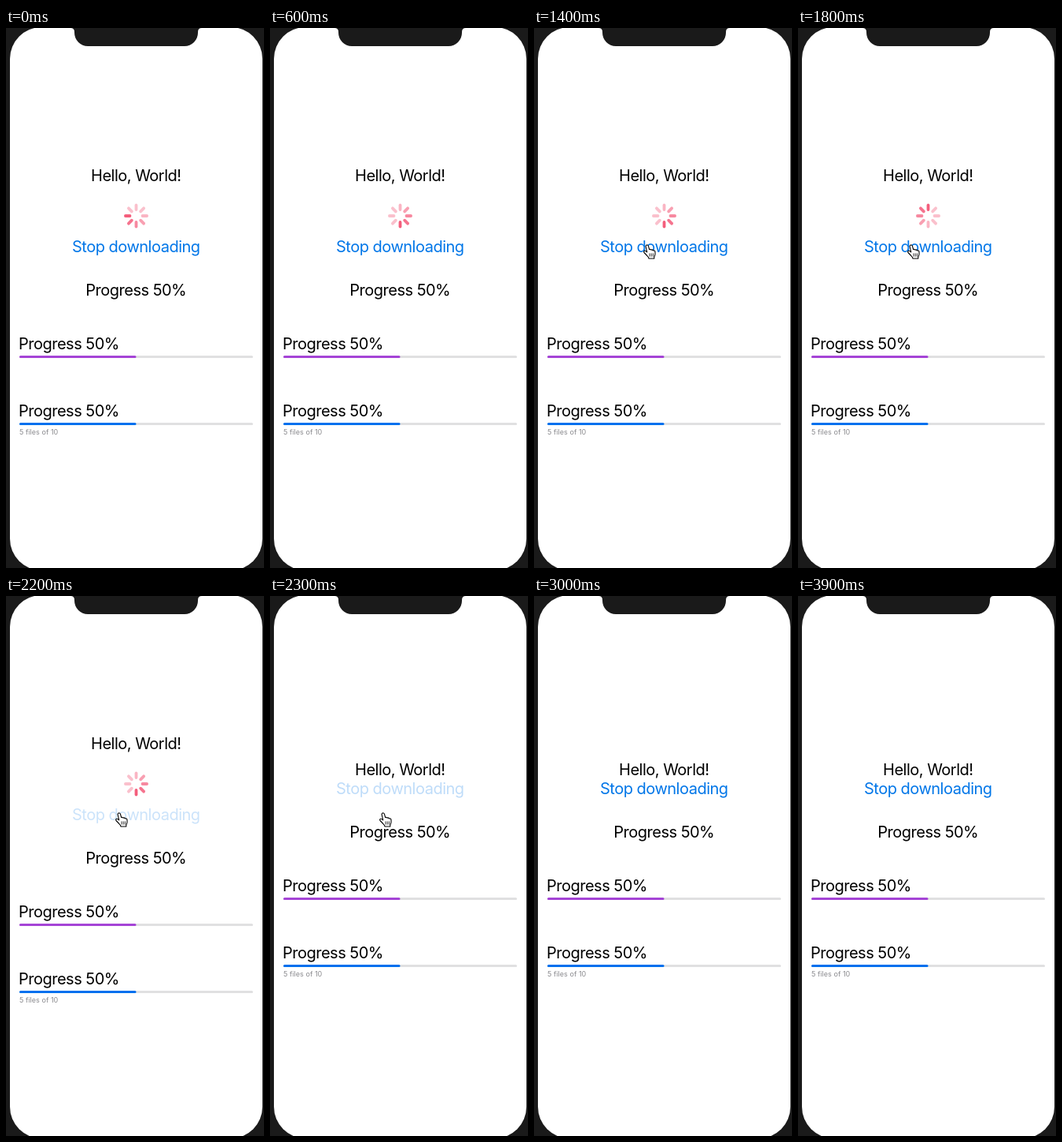
These frames come from a looping animation (328x684 px, 4300 ms). An HTML page:

```html
<!DOCTYPE html>
<html lang="en">
<head>
<meta charset="utf-8">
<title>Download progress</title>
<style>
  html, body { margin: 0; width: 100%; height: 100%; overflow: hidden; background: #1a1a1a; }
  svg { display: block; width: 328px; height: 684px; }
  text { font: 400 20px Inter, "Liberation Sans", sans-serif; letter-spacing: -.5px; }
  .mid { text-anchor: middle; }
  .small { font-size: 9px; letter-spacing: .05px; fill: #8a8a8e; }
  .track { stroke: #e0e0e1; }
  .bar line { stroke-width: 3; stroke-linecap: round; }
</style>
</head>
<body>
<svg viewBox="0 0 328 684">
  <rect width="328" height="684" fill="#1a1a1a"/>
  <rect x="5" y="-1" width="321" height="688" rx="40" fill="#fff"/>
  <path d="M82 0Q87 0 87 5V6A17 17 0 0 0 104 23H227A17 17 0 0 0 244 6V5Q244 0 249 0Z" fill="#1a1a1a"/>

  <text id="hello" class="mid" x="165.3" y="193.5">Hello, World!</text>
  <g id="spinner" transform="translate(165.5 238)" stroke="#f3486b" stroke-width="3.8" stroke-linecap="round"></g>

  <g id="lower">
    <text id="stop" class="mid" x="165.3" y="284.3" fill="#0076e8">Stop downloading</text>
    <text class="mid" x="165.3" y="339.3">Progress 50%</text>
    <text x="16" y="406.7">Progress 50%</text>
    <g class="bar" transform="translate(0 416.5)">
      <line class="track" x1="18.5" x2="312.5"/>
      <line x1="18.5" x2="164" stroke="#a544d6"/>
    </g>
    <text x="16" y="491.7">Progress 50%</text>
    <g class="bar" transform="translate(0 501.5)">
      <line class="track" x1="18.5" x2="312.5"/>
      <line x1="18.5" x2="164" stroke="#0070ee"/>
    </g>
    <text class="small" x="17" y="514.5">5 files of 10</text>
  </g>

  <g id="hand" fill="#fff" stroke="#000" stroke-width="1.1" stroke-linejoin="round" stroke-linecap="round">
    <path d="M4 2.4Q4.4.8 5.8.8Q7.2 1 7.6 2.6L8.6 6.6Q10.2 5.8 11 7.1Q12.7 6.4 13.4 7.9Q15.6 7.3 16 9.6V12.5Q15.6 14.6 14.8 16V18H8L7.5 16.5Q4.6 13 2 10.5Q1 8.7 2.6 8.2Q4 8 5.7 9.8Z"/>
    <path d="M9 11.8V15.2M11.2 11.8V15.2M13.4 11.8V15.2" stroke-width=".8"/>
  </g>
</svg>
<script>
const STEP = 100, STEPS = 43, JUMP = 23, SHIFT = 33;
const REST = [138, 274];
const $ = id => document.getElementById(id);

// Pointer position by step; no entry means off screen
const pointer = {
  2: [312, 351], 3: [238, 347], 4: [160, 338], 5: [94, 324],
  8: [58, 483], 9: [78, 430], 10: [106, 358], 11: [130, 300],
  25: [141, 210], 26: [143, 114]
};
for (let i = 12; i < 25; i++) pointer[i] = REST;

const fade = { 21: .2, 22: .2, 23: .25, 24: .5, 25: .8 };

const spokes = Array.from({ length: 8 }, (_, i) => {
  const line = document.createElementNS("http://www.w3.org/2000/svg", "line");
  line.setAttribute("y1", -8);
  line.setAttribute("y2", -13.6);
  line.setAttribute("transform", `rotate(${i * 45})`);
  $("spinner").append(line);
  return line;
});

function draw(step) {
  const done = step >= JUMP;
  $("hello").setAttribute("transform", `translate(0 ${done ? SHIFT : 0})`);
  $("lower").setAttribute("transform", `translate(0 ${done ? -SHIFT : 0})`);
  $("spinner").style.display = done ? "none" : "";
  $("stop").style.opacity = fade[step] ?? 1;

  const lead = step + 6;
  spokes.forEach((line, i) => {
    const age = (lead - i + 8) % 8;
    line.style.opacity = Math.max(.34, .88 - age * .12);
  });

  const at = pointer[step];
  $("hand").style.display = at ? "" : "none";
  if (at) $("hand").setAttribute("transform", `translate(${at})`);
}

const start = performance.now();
function tick() {
  draw(Math.floor((performance.now() - start) / STEP) % STEPS);
  requestAnimationFrame(tick);
}
tick();
</script>
</body>
</html>
```
